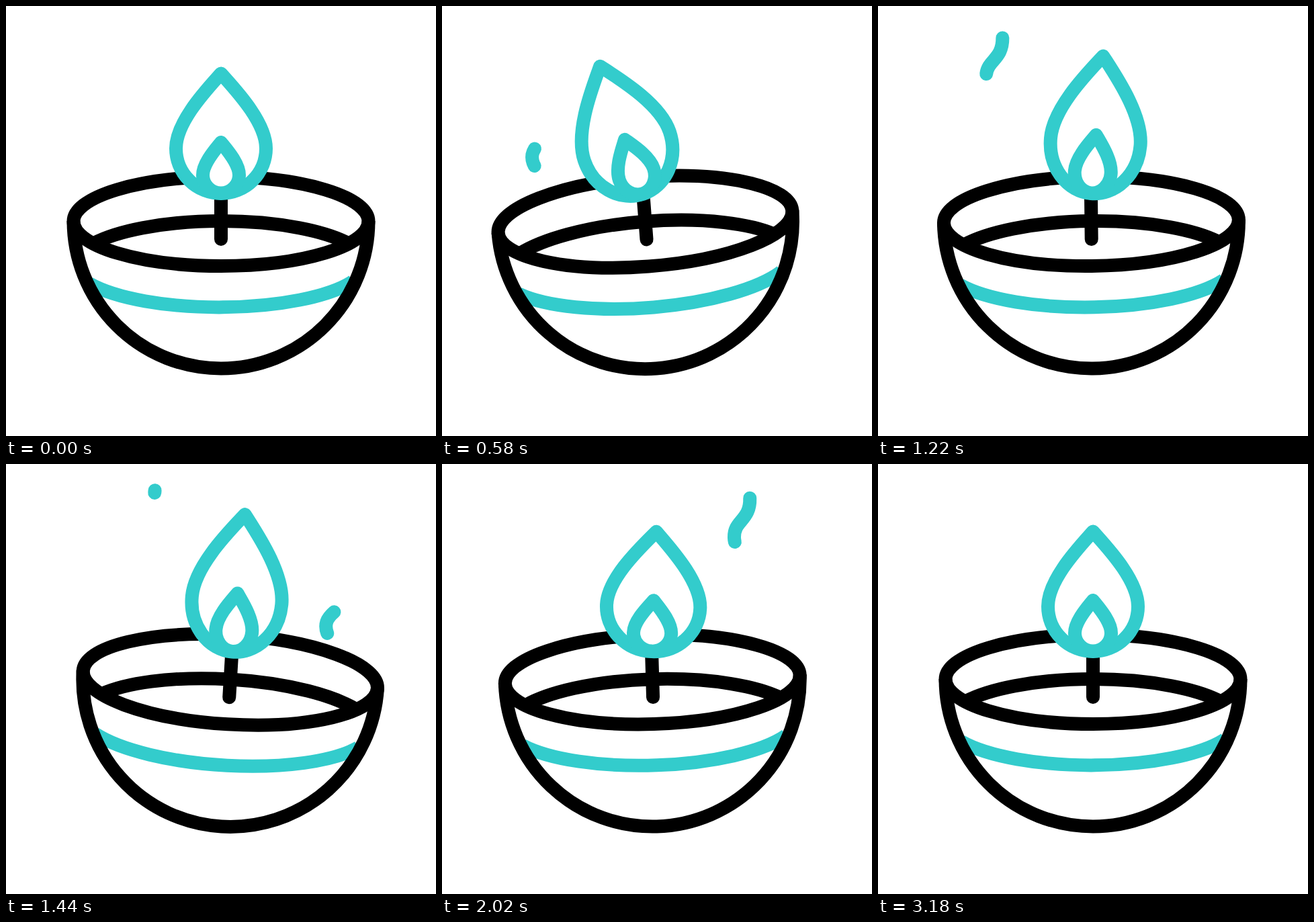
An HTML page that plays this animation: 640x640 px, repeating every 3.6 s.

```html
<!DOCTYPE html>
<html lang="en">
<head>
<meta charset="utf-8">
<title>Oil lamp</title>
<style>
  html, body { margin: 0; width: 100%; height: 100%; overflow: hidden; background: #fff; }
  svg { display: block; width: 640px; height: 640px; }
  path, ellipse { fill: none; stroke: #000; stroke-width: 20; stroke-linejoin: round; }
  .teal { stroke: #33cccc; }
  .round { stroke-linecap: round; }
  #flame path { fill: #fff; vector-effect: non-scaling-stroke; }
</style>
</head>
<body>
<svg viewBox="0 0 640 640">
  <g id="lamp">
    <path class="teal" d="M124 413A219.5 67 0 0 0 516 410"/>
    <path d="M130 353.5A219.5 67 0 0 1 510 353.5"/>
    <path d="M100.5 320A219.5 219.5 0 0 0 539.5 320"/>
    <ellipse cx="320" cy="320.5" rx="219.5" ry="66.5"/>
    <path class="round" d="M320 279V347"/>
    <!-- flame drawn around its base at 0,0 -->
    <g id="flame">
      <path class="teal" d="M0-178.5C-20-156-67-107-67-67A67 67 0 0 0 67-67C67-107 20-156 0-178.5Z"/>
      <path class="teal" d="M0-76C-8-66-27-45-27-27.5A27 27 0 0 0 27-27.5C27-45 8-66 0-76Z"/>
    </g>
    <path class="teal round smoke" pathLength="1"/>
    <path class="teal round smoke" pathLength="1"/>
  </g>
</svg>
<script>
  const LOOP = 3600;
  const WISP = "M162 225Q158 216 160 208C165 190 190 185 190 158C190 132 166 128 166 104C166 78 191 80 191 46";
  const WISP_TIME = 780, TAIL_LAG = 332;
  const wisps = [
    { start: 396, x: 0, y: 0, dx: 0, dy: 0 },
    { start: 1225, x: 298, y: 18, dx: -25, dy: -14 }
  ];

  const lamp = document.getElementById("lamp");
  const flame = document.getElementById("flame");
  const smokes = [...document.querySelectorAll(".smoke")];
  smokes.forEach(s => s.setAttribute("d", WISP));

  const clamp = p => Math.min(1, Math.max(0, p));
  const ease = p => (1 - Math.cos(Math.PI * clamp(p))) / 2;
  const ramp = (t, from, to) => ease((t - from) / (to - from));

  // Rises from a to b, holds until c, falls until d.
  const pulse = (t, a, b, c, d) => ramp(t, a, b) - ramp(t, c, d);

  // Leaves rest at the first turn, swings by `first`, multiplies by `ratio` at each turn, ends at rest.
  function swing(t, turns, first, ratio) {
    const last = turns.length - 1;
    const peak = i => i === 0 || i === last ? 0 : first * ratio ** (i - 1);
    let angle = 0;
    for (let i = 0; i < last; i++)
      angle += (peak(i + 1) - peak(i)) * ramp(t, turns[i], turns[i + 1]);
    return angle;
  }

  function drawWisp(el, w, t) {
    const tailStart = w.start + TAIL_LAG;
    const head = ramp(t, w.start, w.start + WISP_TIME);
    const tail = ramp(t, tailStart, tailStart + WISP_TIME);
    const length = head - tail;
    el.style.display = length > 0.002 ? "" : "none";
    el.setAttribute("transform", `translate(${w.x + w.dx * tail} ${w.y + w.dy * tail})`);
    el.setAttribute("stroke-dasharray", `${Math.max(0, length)} 3`);
    el.setAttribute("stroke-dashoffset", -tail);
  }

  function draw(t) {
    const roll = swing(t, [180, 880, 1480, 1970, 2300], -7.13, -0.5);
    const lean = swing(t, [0, 620, 1200, 1700, 2020], -14.4, -0.4)
               + swing(t, [1700, 2020, 2560, 3180], 3.9, -1.18);
    const tall = 1 + 0.15 * (pulse(t, 0, 800, 1660, 2020) + pulse(t, 2020, 2480, 2480, 3180));
    const wide = 1 + 0.04 * pulse(t, 1600, 2020, 2020, 2480);

    lamp.setAttribute("transform", `rotate(${roll} 320 550)`);
    flame.setAttribute("transform", `translate(320 279) rotate(${lean}) scale(${wide} ${tall})`);
    smokes.forEach((el, i) => drawWisp(el, wisps[i], t));
  }

  const start = performance.now();
  function tick() {
    draw((performance.now() - start) % LOOP);
    requestAnimationFrame(tick);
  }
  tick();
</script>
</body>
</html>
```
